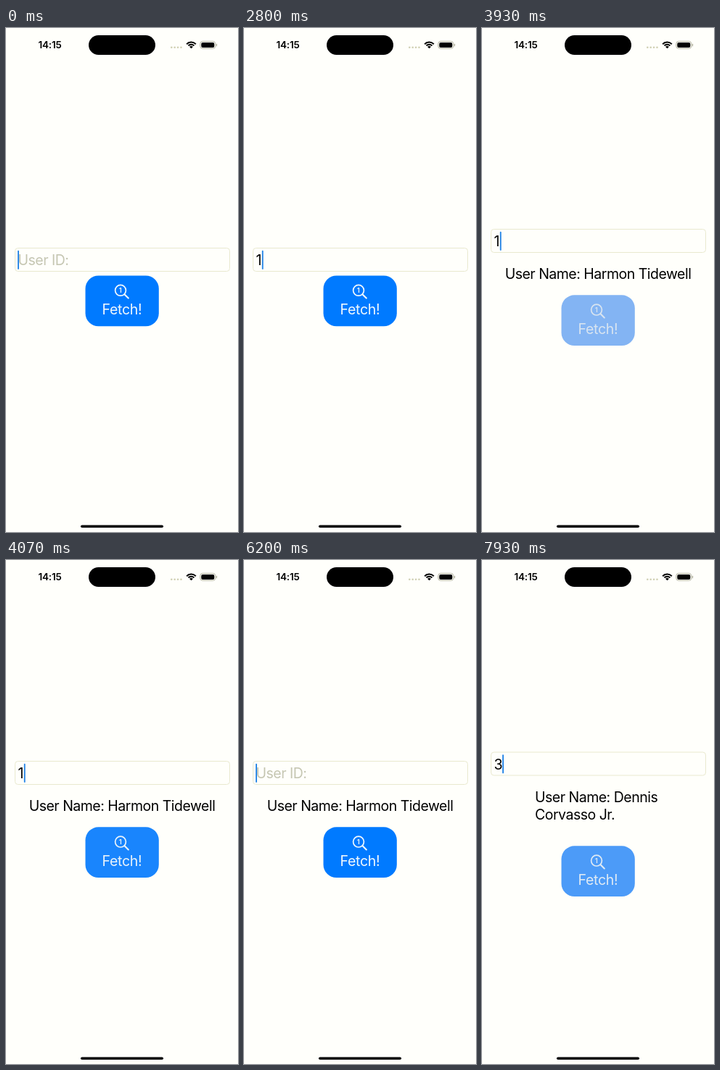
These frames come from a looping animation (320x695 px, 8000 ms). An HTML page with a canvas:

```html
<!DOCTYPE html>
<html lang="en">
<head>
<meta charset="utf-8">
<title>Fetch user</title>
<style>
  html, body { margin: 0; width: 100%; height: 100%; overflow: hidden; background: #fffffb; }
  canvas { display: block; width: 100%; height: 100%; }
</style>
</head>
<body>
<canvas id="stage"></canvas>
<script>
const W = 320, H = 695, LOOP = 8000;
const canvas = document.getElementById('stage');
const ctx = canvas.getContext('2d');
const FAMILY = 'Inter, Roboto, sans-serif';
const BODY = '400 19.5px ' + FAMILY;

const BLUE = [0, 122, 255], PALE = [217, 217, 235];
const WHITE = [240, 248, 253], FAINT = [211, 224, 238];

// Moments of the interaction, in ms
const TYPE_1 = 2730, TAP_1 = 3590, REPLY_1 = 3860;
const CLEAR = 6130, TYPE_2 = 6600, TAP_2 = 7660, REPLY_2 = 7800;
const FADE = 320;

const LAYOUTS = [
  { field: 303.5, button: 341.5, lines: [] },
  { field: 277.5, button: 368.3, lines: ['User Name: Harmon Tidewell'], x: 160, y: 346, align: 'center' },
  { field: 265, button: 394.3, lines: ['User Name: Dennis', 'Corvasso Jr.'], x: 73, y: 333.5, align: 'left' }
];

const clamp = v => Math.max(0, Math.min(1, v));
const easeOut = v => 1 - (1 - clamp(v)) ** 2;
const mix = (a, b, k) => `rgb(${a.map((v, i) => Math.round(v + (b[i] - v) * k))})`;

function text(str, x, y, color, font = BODY, align = 'left', spacing = -0.5) {
  ctx.font = font;
  ctx.letterSpacing = spacing + 'px';
  ctx.textAlign = align;
  ctx.fillStyle = color;
  ctx.fillText(str, x, y);
}

function roundRect(x, y, w, h, r) {
  ctx.beginPath();
  ctx.roundRect(x, y, w, h, r);
}

function fillRound(x, y, w, h, r, color) {
  roundRect(x, y, w, h, r);
  ctx.fillStyle = color;
  ctx.fill();
}

function strokeRound(x, y, w, h, r, color) {
  roundRect(x, y, w, h, r);
  ctx.strokeStyle = color;
  ctx.lineWidth = 1;
  ctx.stroke();
}

function drawWifi(x, y) {
  ctx.strokeStyle = '#000';
  ctx.lineWidth = 2;
  for (const r of [8.7, 5.5]) {
    ctx.beginPath();
    ctx.arc(x, y, r, -Math.PI * 0.76, -Math.PI * 0.24);
    ctx.stroke();
  }
  ctx.beginPath();
  ctx.moveTo(x, y);
  ctx.arc(x, y, 3.3, -Math.PI * 0.76, -Math.PI * 0.24);
  ctx.fillStyle = '#000';
  ctx.fill();
}

function drawSystem() {
  text('14:15', 60.5, 28.4, '#000', '600 13.5px ' + FAMILY, 'center', -0.2);
  fillRound(114, 10, 92, 27, 13.5, '#000');
  for (let i = 0; i < 4; i++) fillRound(227 + i * 4.4, 25.5, 2.6, 2.6, 1.3, '#cfcfb2');
  drawWifi(255.5, 28.2);
  strokeRound(267.8, 18.4, 21, 10, 3.4, '#b4b4a0');
  fillRound(269.3, 19.9, 18, 7, 2, '#000');
  fillRound(289.8, 21.7, 1.3, 3.6, 0.6, '#b4b4a0');
  fillRound(103, 685.4, 114, 3.6, 1.8, '#000');
}

// The caret stays solid after each edit, then blinks once a second
function caretAlpha(t) {
  const start = t < TYPE_1 ? 0 : t < CLEAR ? 2800 : t < TYPE_2 ? CLEAR : TYPE_2;
  const p = Math.max(0, t - start) % 1000;
  return p < 700 ? 1 - clamp((p - 440) / 150) : clamp((p - 800) / 130);
}

function drawField(t, y) {
  const value = t < TYPE_1 ? '' : t < CLEAR ? '1' : t < TYPE_2 ? '' : '3';
  strokeRound(12.5, y, 296, 32, 4, '#e9e9cf');
  if (value) text(value, 16.5, y + 23.7, '#000');
  else text('User ID:', 16.5, y + 23.7, '#c5c6b2');
  const x = { '': 17, '1': 25.7, '3': 29 }[value];
  ctx.globalAlpha = caretAlpha(t);
  fillRound(x - 0.9, y + 3.3, 1.8, 26, 0.9, '#1a7fe6');
  ctx.globalAlpha = 1;
}

function buttonLevel(t) {
  if (t < TAP_1) return 1;
  if (t < TAP_2) return easeOut((t - REPLY_1) / FADE);
  return easeOut((t - REPLY_2) / FADE);
}

function drawButton(t, y) {
  const level = buttonLevel(t);
  const ink = mix(FAINT, WHITE, level ** 2);
  fillRound(109.5, y, 101.3, 69.8, 18, mix(PALE, BLUE, level));
  ctx.strokeStyle = ink;
  ctx.lineCap = 'round';
  ctx.lineWidth = 1.7;
  ctx.beginPath();
  ctx.arc(158, y + 20.3, 7.4, 0, Math.PI * 2);
  ctx.stroke();
  ctx.lineWidth = 2.1;
  ctx.beginPath();
  ctx.moveTo(163.6, y + 25.9);
  ctx.lineTo(168.8, y + 31.1);
  ctx.stroke();
  ctx.lineCap = 'butt';
  text('1', 157.7, y + 23.8, ink, '600 9.5px ' + FAMILY, 'center', 0);
  text('Fetch!', 160, y + 53.3, ink, BODY, 'center', -0.3);
}

function draw(t) {
  const layout = LAYOUTS[t < REPLY_1 ? 0 : t < REPLY_2 ? 1 : 2];
  ctx.fillStyle = '#fffffb';
  ctx.fillRect(0, 0, W, H);
  drawSystem();
  drawField(t, layout.field);
  layout.lines.forEach((line, i) =>
    text(line, layout.x, layout.y + i * 24.8, '#000', BODY, layout.align));
  drawButton(t, layout.button);
}

function resize() {
  const ratio = window.devicePixelRatio || 1;
  canvas.width = Math.round(innerWidth * ratio);
  canvas.height = Math.round(innerHeight * ratio);
  ctx.setTransform(canvas.width / W, 0, 0, canvas.height / H, 0, 0);
}

function tick() {
  draw(performance.now() % LOOP);
  requestAnimationFrame(tick);
}

addEventListener('resize', resize);
resize();
tick();
</script>
</body>
</html>
```
